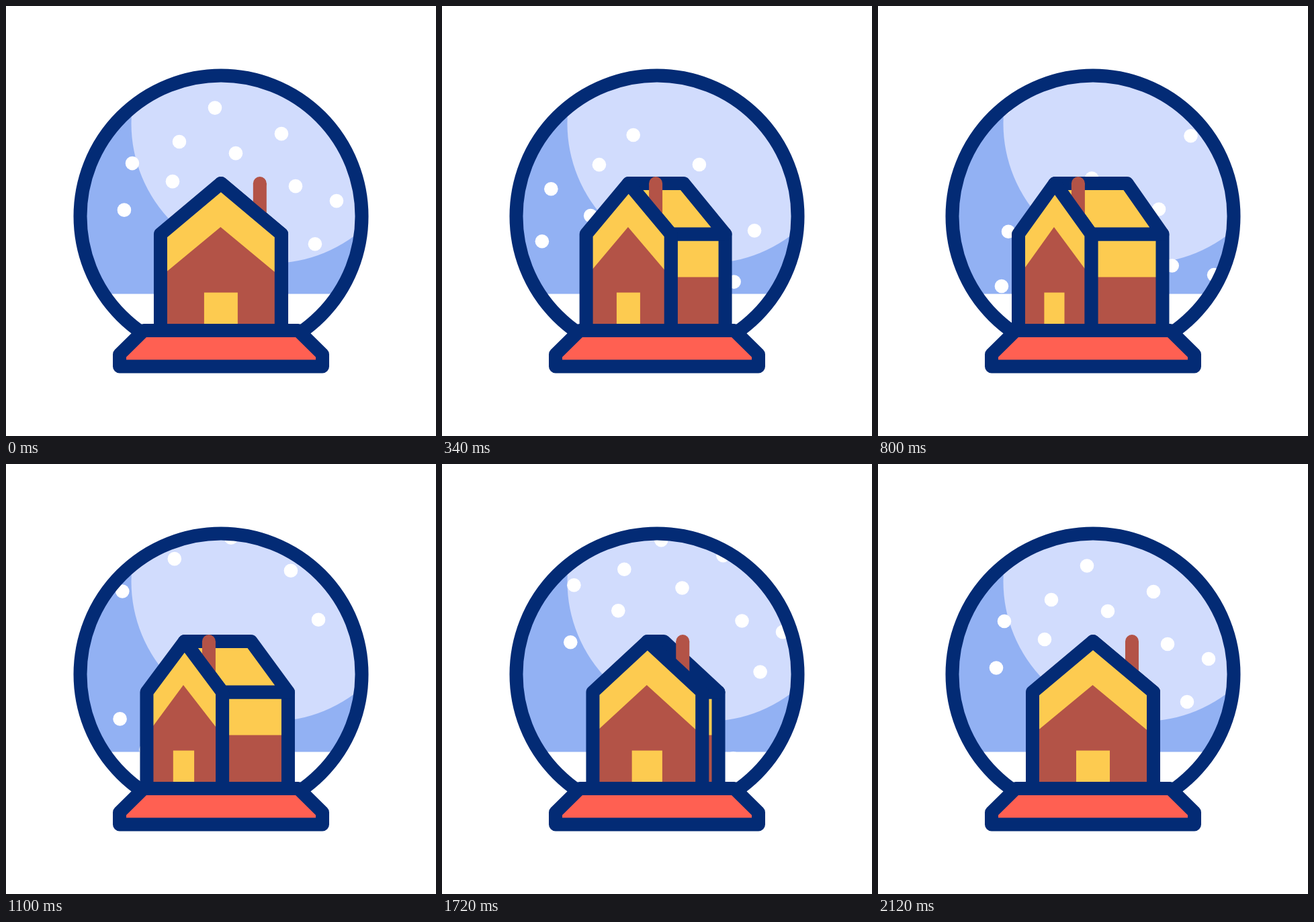
Recreate the animation shown at these times as an HTML page with a canvas. Size 640x640 px, loop 2.4 s.

```html
<!DOCTYPE html>
<html lang="en">
<head>
<meta charset="utf-8">
<title>Snow globe</title>
<style>
  html, body { margin: 0; width: 100%; height: 100%; overflow: hidden; background: #fff; }
  canvas { display: block; width: 640px; height: 640px; }
</style>
</head>
<body>
<canvas id="stage" width="640" height="640"></canvas>
<script>
const ctx = document.getElementById('stage').getContext('2d');
const LOOP = 2400, END = 2120;
const NAVY = '#032b75', SKY = '#92b1f3', GLOW = '#d1dcfd', WALL = '#b35347',
      YELLOW = '#fdcb50', RED = '#ff6052', WHITE = '#fff';

// Where each flake rests, and how slowly it sets off and settles.
const FLAKES = [
  { x: 311, y: 151.5, start: 14.6, settle: 18 },
  { x: 410, y: 190, start: 6.5, settle: -3 },
  { x: 258, y: 202, start: 24, settle: 8.5 },
  { x: 342, y: 219, start: 3, settle: 23 },
  { x: 188, y: 234, start: 18, settle: -3 },
  { x: 248, y: 261, start: -1, settle: 12 },
  { x: 431, y: 268, start: 0, settle: 23 },
  { x: 492, y: 290, start: 9, settle: 15.5 },
  { x: 176, y: 303.5, start: 5.5, settle: 18 },
  { x: 460, y: 354, start: -9, settle: 9.5 }
];

const POSES = {
  front: { left: 230, seam: 410, right: 410, back: 320, chimney: 378, door: 320 },
  turned: { left: 208.7, seam: 314, right: 426, back: 375, chimney: 295, door: 261 },
  drifted: { left: 210, seam: 328, right: 415.5, back: 357, chimney: 307, door: 267 }
};
const TURNS = [
  { from: 0, to: 520, a: POSES.front, b: POSES.turned, ease: easeOut(1.2) },
  { from: 520, to: 1440, a: POSES.turned, b: POSES.drifted, ease: u => u ** 1.2 },
  { from: 1440, to: END, a: POSES.drifted, b: POSES.front, ease: easeOut(2.4) }
];

function easeOut(power) {
  return u => 1 - (1 - u) ** power;
}

function poseAt(t) {
  const turn = TURNS.find(s => t < s.to);
  if (!turn) return POSES.front;
  const { from, to, a, b, ease } = turn;
  const k = ease((t - from) / (to - from));
  const pose = {};
  for (const key in a) pose[key] = a[key] + (b[key] - a[key]) * k;
  return pose;
}

// Distance fallen after some time, with a soft lag near rest.
function fall(ms, speed, lag) {
  const s = Math.max(ms, 0) / 1000;
  return speed * s - lag * (1 - Math.exp(-s / .3));
}

// Sideways swing at a height above (negative) or below the resting place.
function sway(dy) {
  const swing = (width, height) => width * Math.sin(Math.PI * (Math.abs(dy) / height) ** 1.15);
  if (dy < 0) return swing(15.5, 64);
  return -swing(26, 82) - 24 * Math.sin(Math.PI * dy / 300) ** 4;
}

function shape(points, fill, stroke) {
  ctx.beginPath();
  points.forEach(([x, y]) => ctx.lineTo(x, y));
  ctx.closePath();
  if (fill) { ctx.fillStyle = fill; ctx.fill(); }
  if (stroke) { ctx.strokeStyle = stroke; ctx.stroke(); }
}

function disc(x, y, r, fill) {
  ctx.beginPath();
  ctx.arc(x, y, r, 0, Math.PI * 2);
  if (fill) { ctx.fillStyle = fill; ctx.fill(); }
}

function box(x, y, w, h, fill) {
  ctx.fillStyle = fill;
  ctx.fillRect(x, y, w, h);
}

function drawGlobe(t) {
  ctx.save();
  disc(320, 313, 205, SKY);
  ctx.clip();
  disc(394.5, 175, 208, GLOW);
  box(100, 428.5, 440, 120, WHITE);
  for (const f of FLAKES) {
    const leaving = fall(t, 148, f.start);
    const arriving = -fall(END - t, 129, f.settle);
    for (const dy of [leaving, arriving]) disc(f.x + sway(dy), f.y + dy, 10.3, WHITE);
  }
  ctx.restore();
  disc(320, 313, 209.5);
  ctx.strokeStyle = NAVY;
  ctx.stroke();
}

function drawHouse({ left, seam, right, back, chimney, door }) {
  const top = 264, eave = 339.5, base = 483, edge = 404;
  const apex = (left + seam) / 2, doorWidth = (seam - left) * 50 / 180;

  // side wall and roof
  const side = [[seam, eave], [right, eave], [right, base], [seam, base]];
  shape(side, YELLOW);
  box(seam, edge - .5, right - seam, base - edge, WALL);
  shape(side, null, NAVY);
  shape([[apex, top], [back, top], [right, eave], [seam, eave]], YELLOW, NAVY);

  disc(chimney, top, 10, WALL);
  box(chimney - 10, top, 20, 51, WALL);

  // gable
  const gable = [[left, base], [left, eave], [apex, top], [seam, eave], [seam, base]];
  shape(gable, YELLOW);
  shape([[left, base], [left, edge - 1], [door - .5, 329], [seam, edge], [seam, base]], WALL);
  box(door - doorWidth / 2, 426.5, doorWidth, 50, YELLOW);
  shape(gable, null, NAVY);
}

function drawBase() {
  shape([[205, 483], [435, 483], [471, 518.5], [471, 536.5], [169, 536.5], [169, 518.5]], RED, NAVY);
}

function draw(t) {
  box(0, 0, 640, 640, WHITE);
  ctx.lineWidth = 20;
  ctx.lineJoin = 'round';
  drawGlobe(t);
  drawHouse(poseAt(t));
  drawBase();
}

const begin = performance.now();
function tick() {
  draw((performance.now() - begin) % LOOP);
  requestAnimationFrame(tick);
}
tick();
</script>
</body>
</html>
```
